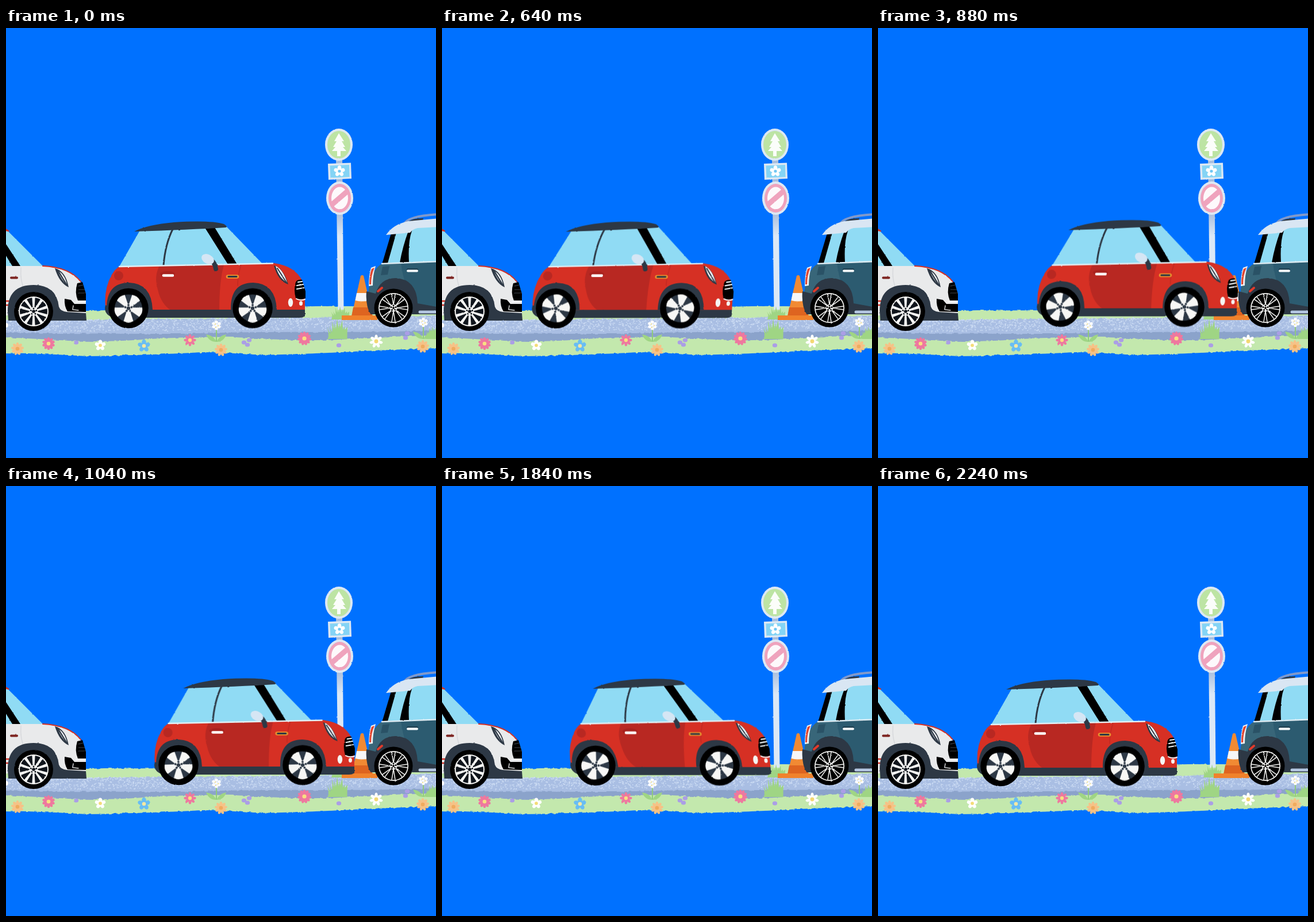
An HTML page for the animation above (2.32 s loop, 748 by 748 pixels).

```html
<!DOCTYPE html>
<html lang="en">
<head>
<meta charset="utf-8">
<title>Parking</title>
<style>
  html, body { margin: 0; width: 100%; height: 100%; overflow: hidden; background: #0071ff; }
  svg { display: block; width: 100vw; height: 100vh; }
</style>
</head>
<body>
<svg id="stage" viewBox="0 0 748 748" xmlns="http://www.w3.org/2000/svg"></svg>
<script>
const DARK = '#2d3845', GLASS = '#90dbf4', PALE = '#dce8f4', RED = '#d63024';
const LOOP = 2320;

// Seeded random numbers for the road texture.
let seed = 11;
const rand = () => (seed = (seed * 16807) % 2147483647) / 2147483647;

const shape = (d, fill) => `<path d="${d}" fill="${fill}"/>`;
const line = (d, color, width, cap = 'round') =>
  `<path d="${d}" fill="none" stroke="${color}" stroke-width="${width}" stroke-linecap="${cap}"/>`;
const oval = (x, y, rx, ry, fill, turn = 0) =>
  `<ellipse cx="${x}" cy="${y}" rx="${rx}" ry="${ry}" fill="${fill}" transform="rotate(${turn} ${x} ${y})"/>`;
const dot = (x, y, r, fill) => oval(x, y, r, r, fill);
const at = (x, y, body) => `<g transform="translate(${x} ${y})">${body}</g>`;
const rough = (kind, body) => `<g filter="url(#${kind})">${body}</g>`;
const ring = (n, draw) =>
  Array.from({ length: n }, (_, i) => `<g transform="rotate(${i * 360 / n})">${draw(i)}</g>`).join('');

const roughFilter = (id, freq, scale) => `
  <filter id="${id}" filterUnits="userSpaceOnUse" x="-40" y="140" width="830" height="450" color-interpolation-filters="sRGB">
    <feTurbulence type="fractalNoise" baseFrequency="${freq}" numOctaves="2" seed="4"/>
    <feDisplacementMap in="SourceGraphic" scale="${scale}" xChannelSelector="R" yChannelSelector="G"/>
  </filter>`;

const flower = (x, y, r, n, color, core) => at(x, y,
  ring(n, () => oval(0, -r * .58, r * (n > 6 ? .23 : .34), r * .43, color)) + dot(0, 0, r * .3, core));

const tuft = (x, y, w, h, color) => {
  const blades = Array.from({ length: 9 }, (_, i) => {
    const k = (i - 4) / 4;
    const tip = h * (1 - .4 * k * k) * (i % 2 ? .8 : 1);
    return `M${k * w * .7 - 4} 0Q${k * w * .6 - 2} ${-tip * .5} ${k * w} ${-tip}Q${k * w * .8 + 3} ${-tip * .4} ${k * w * .7 + 5} 0Z`;
  });
  return at(x, y, shape(blades.join(''), color));
};

const sprig = (x, y) => at(x, y,
  line('M0 4V28', '#8fcb7c', 2) +
  shape('M0 29Q-4 18-18 16Q-13 29 0 29Q13 29 17 16Q5 18 0 29Z', '#9fd584') +
  ring(6, () => dot(0, -5.5, 2.7, '#fff')) + dot(0, 0, 2.6, '#fff') +
  dot(-2, -2, 1, '#f4dc74') + dot(3, 1, 1, '#f4dc74') + dot(-1, 4, 1, '#f4dc74'));

const berries = (x, y, n) => Array.from({ length: n }, (_, i) =>
  oval(x + [0, 3, -6][i], y + [4, -4, 0][i], 4.2, 3.6, '#ab9ee6')).join('');

function ground() {
  const back = 'M-5 493Q90 494 172 491Q340 492 420 488Q520 483 600 484Q680 486 755 492V515H-5Z';
  const road = 'M-5 508Q140 508 260 506Q420 505 520 504Q640 503 755 500V545H-5Z';
  const curb = 'M-5 530Q150 532 300 532Q420 528 560 529Q660 529 755 526V550H-5Z';
  const front = 'M-5 538Q60 541 110 544Q180 547 250 541Q330 536 400 538Q450 541 500 543Q550 544 600 541Q670 536 755 535V557'
    + 'Q690 559 620 562Q520 568 430 569Q390 564 340 564Q250 569 140 571Q80 567 -5 565Z';
  let specks = '';
  for (let i = 0; i < 1500; i++) {
    const x = rand() * 748, top = 508 - x * .008;
    specks += `M${x.toFixed(1)} ${(top + rand() ** 1.25 * 21).toFixed(1)}h.8`;
  }
  return rough('coarse',
    shape(back, '#c3e8ad') + shape(road, '#a9bee3') + line(specks, '#cbdbf3', 1.5) +
    shape(curb, '#8ba3cb') + shape(front, '#c3e8ad'));
}

function meadow() {
  const orange = ['#f6c287', '#f0ab5e'], pink = ['#ee789f', '#f8df82'];
  return rough('fine',
    tuft(576, 541, 18, 36, '#9fd584') +
    flower(20, 558, 11, 9, ...orange) +
    flower(74, 549, 11, 10, ...pink) +
    berries(122, 543, 1) +
    flower(164, 552, 9.5, 5, '#fff', '#f3dc76') +
    flower(240, 553, 11, 5, '#68bdf4', '#f4e8a2') +
    flower(320, 543, 10.5, 8, ...pink) +
    sprig(366, 517) +
    flower(374, 560, 11, 9, ...orange) +
    berries(420, 547, 3) +
    flower(519, 540, 12, 11, ...pink) +
    berries(579, 548, 1) +
    flower(644, 545, 11.5, 7, '#fff', '#f3d873') +
    berries(695, 535, 2) +
    flower(725, 554, 11, 9, ...orange) +
    sprig(726, 512) + tuft(742, 541, 11, 22, '#9fd584') +
    dot(0, 517, 4, '#fff'));
}

function signs() {
  const tree = 'M579 183L588 197H584L590 207H586L592 214H582V223H576V214H567L573 207H569L575 197H571Z';
  const petals = at(580, 249, ring(5, () => oval(0, -5.6, 3.3, 4.2, '#fff')) + dot(0, 0, 2.6, '#71c7f3'));
  return rough('fine',
    shape('M574 226H585L587.5 490H577.5Z', 'url(#pole)') +
    oval(579, 203, 24, 28, PALE) + oval(579, 203, 20, 24, '#bde4a4') + shape(tree, '#fbfdfa') +
    shape('M560 236L600 234.5L601 262L561 264Z', PALE) +
    shape('M563.5 239.5L597 238L597.5 259L564.5 260.5Z', '#84d4f5') + petals +
    oval(580.5, 296, 23.5, 29, PALE) + oval(580.5, 296, 19.5, 25, '#efa3bd') +
    oval(580.5, 296, 14.5, 19.5, '#fdf9fb') + line('M566 308L595 283', '#efa3bd', 9, 'butt'));
}

function cone() {
  return rough('fine',
    tuft(581, 507, 16, 23, '#9fd584') +
    shape('M617 431Q620 429 622 431L638 502H601Z', '#f18a33') +
    shape('M604 486H634L638 502H601Z', '#de6420') +
    shape('M610 461H629L632 474Q620 477 607.5 474Z', '#f6f6f8') +
    shape('M584 500H646V508H584Z', '#f0822c'));
}

const tyre = (r, rim) => dot(0, 0, r, '#000') + rim;

function whiteCar() {
  const rim = dot(0, 0, 26, '#f5f5f3') + dot(0, 0, 24, '#10151c') +
    ring(10, () => shape('M-1.4-5L-2.7-25H2.7L1.4-5Z', '#f5f5f3')) +
    dot(0, 0, 7.5, '#f5f5f3') + ring(5, () => dot(0, -5, 1.5, '#10151c')) + dot(0, 0, 2.8, '#10151c');
  return rough('fine',
    shape('M-5 346L6 353L2 357H-5Z', RED) +
    shape('M-5 352L4 354L64 414H-5Z', GLASS) +
    shape('M-5 368L0 376L25 414H11L-5 388Z', '#000') +
    shape('M-5 414L64 414Q112 418 129 441L139 462V500H-5Z', '#e9eaeb') +
    line('M64 414Q110 416 130 441', RED, 2) +
    line('M-5 475H12M-5 482H9', RED, 2.6, 'butt') +
    line('M26 417Q24 440 33 458', '#d7d9dc', 1.5) +
    line('M9 434.5H19', '#7d2420', 4) +
    shape('M3 492Q3 447 48 447Q88 447 92 485Q95 493 106 494L139 496L140 509H4Z', DARK) +
    shape('M85 418Q104 423 109 451Q93 444 85 418Z', DARK) +
    shape('M90 422Q102 428 106 446Q96 439 90 422Z', '#f1f3f6') +
    line('M91 423L105 446', DARK, 2.4) +
    shape('M124 444L133 442L139 462V474H125Q119 460 124 444Z', '#000') +
    line('M126 449L134 447M126 455H137M126 461H138', '#41474f', 1.2, 'butt') +
    line('M122 476H138', '#f5f7fa', 2) +
    shape('M102 471L113 473L119 480H139V494L107 493Q101 484 102 471Z', '#000') +
    line('M117 483L116 490L126 491', '#e9eaeb', 1.4) +
    at(48, 493, tyre(34, rim)));
}

function tealCar() {
  const rim = dot(0, 0, 26, '#f5f5f3') + dot(0, 0, 24.3, '#000') +
    ring(8, () => line('M0-5L-3-24M0-5L3-24', '#f5f5f3', 1.5)) +
    dot(0, 0, 6.5, '#f5f5f3') + ring(5, () => dot(0, -4.3, 1.5, '#000')) + dot(0, 0, 2, '#000');
  return rough('fine',
    line('M693 341Q698 327 752 324', '#8099cb', 4) +
    shape('M699 338Q704 331 726 331L724 338Z', DARK) +
    shape('M670 357L755 343V408L654 411Z', '#000') +
    shape('M679 356L700 353Q690 380 685 408L664 409Z', GLASS) +
    shape('M706 353Q707 347 714 346L755 343V406L701 408Q699 372 706 353Z', GLASS) +
    shape('M661 360Q674 341 700 336L755 331V346L716 348Q707 350 703 356Z', '#d9e6f3') +
    shape('M654 410L755 406V496H640L630 462Q634 421 654 410Z', '#386679') +
    shape('M687 409L755 406V496H716Q692 450 687 409Z', '#2c5b70') +
    line('M654 410L755 406', '#dcebf2', 2.6) +
    shape('M655 415L667 414L664 429L652 430Z', '#2a5266') +
    shape('M635 417L643 414Q638 430 638 448L631 449Q631 430 635 417Z', '#edf0f2') +
    shape('M636 419L641 417Q635 430 635 446L632 446Q632 430 636 419Z', '#e14531') +
    shape('M627 458L643 462Q651 435 678 435Q714 437 716 479L755 486V498H634Q625 482 627 458Z', DARK) +
    line('M720 494H755', '#b4c7e2', 5) +
    line('M647 458L654 452', '#e33a2a', 4) +
    line('M699 420H715', '#1e4052', 4) + line('M699 422.5H715', '#f7fafb', 3.8) +
    at(674, 487, tyre(33.5, rim)));
}

function redBody() {
  const arch = x => `M${x - 38} 490Q${x - 39} 443 ${x + 1} 443Q${x + 40} 444 ${x + 42} 490Z`;
  return rough('fine',
    shape('M233 352L197 415L446 410L383 345Z', GLASS) +
    line('M290 350Q277 376 274 413', DARK, 3) +
    shape('M347 349L363 347L402 411L386 411Z', '#000') +
    shape('M223 354Q246 342 292 338Q356 334 379 341Q387 346 382 347Q320 351 223 354Z', DARK) +
    shape('M173 486Q170 454 184 429Q190 419 197 415L466 409Q502 414 515 439L520 470V493H173Z', RED) +
    shape('M267 414Q257 432 264 455Q270 482 290 493H371Q371 440 379 412Z', '#b82822') +
    line('M409 412Q403 430 403 448', '#c22a22', 1.6) +
    line('M197 415L464 409.5', '#e3eff4', 2.4) +
    dot(196, 431, 8, '#b82822') +
    oval(281, 428, 13, 5, '#a8221e') + line('M274 430.5H290', '#fff', 4.6) +
    line('M386 432.5H402', '#e8912d', 6.5) + line('M387 432.5H401', DARK, 3) +
    line('M358 405Q363 408 365 419', DARK, 8) + oval(351, 402, 11.5, 8, '#d5e6f4', 28) +
    shape('M173 482L182 486L185 490H520V501Q518 504 510 504H188Q172 500 172 487Z', DARK) +
    shape(arch(213) + arch(429), DARK) +
    shape('M466 413Q483 418 491 446Q473 440 466 413Z', DARK) +
    shape('M469 414Q482 420 489 443Q475 435 469 414Z', '#f7f8fa') +
    line('M472 418L488 443', DARK, 2) +
    shape('M504 442Q507 437 515 438L521 458V470Q512 474 504 470Q500 455 504 442Z', '#000') +
    line('M508 442L515 441M506 448L517 446M506 454L518 452', '#edf3f7', 2.2) +
    line('M505 471Q512 475 520 472', '#f3f5f7', 2) +
    oval(495, 477.5, 4.2, 7.5, '#f5f5f3') + oval(513, 479, 3, 4, '#f5f5f3'));
}

function redWheel(x) {
  const blades = ring(5, () => shape('M-3 5L-8.5 22.5Q0 27 8.5 22.5L3 5Z', '#f7f7f5'));
  const hub = dot(0, 0, 8, '#f7f7f5') + ring(5, () => dot(0, -5.6, 1.9, DARK)) + dot(0, 0, 3.2, DARK);
  return at(x, 487.5, dot(0, 0, 34.8, '#000') + `<g class="spin">${dot(0, 0, 24, DARK) + blades + hub}</g>`);
}

document.getElementById('stage').innerHTML = `
  <defs>
    ${roughFilter('fine', .2, 1.8)}${roughFilter('coarse', .14, 4.5)}
    <linearGradient id="pole" gradientUnits="userSpaceOnUse" x1="0" y1="322" x2="0" y2="362">
      <stop offset="0" stop-color="#a9bedd"/><stop offset="1" stop-color="#dbe8f6"/>
    </linearGradient>
  </defs>
  ${ground()}${signs()}${cone()}${whiteCar()}${tealCar()}
  <g id="body">${redBody()}</g>
  <g id="wheels">${rough('fine', redWheel(213) + redWheel(429))}</g>
  ${meadow()}`;

// time, wheel travel, body travel, lean
const steps = [
  [0, 0, 0, 0],
  [480, -9, -11.5, -.017], [560, -26, -28, -.05], [640, -15, -16, .06],
  [720, 21.5, 20.5, .118], [800, 66, 65, .1], [880, 104, 104, .03],
  [960, 96, 95, -.04], [1040, 87, 86, -.005],
  [1600, 91, 91.5, .04], [1680, 104, 106, .06], [1760, 88, 89, 0],
  [1840, 54, 52, -.09], [1920, 16, 14, -.09], [2000, -13, -15, -.03],
  [2080, -10, -11, .03], [2160, -4, -5, .015], [2240, 0, 0, 0],
  [LOOP, 0, 0, 0]
];
const BASE = 495, RADIUS = 34.8, SLOPE = -.023;

function play(el, pose) {
  const frames = steps.map(([time, ...values]) =>
    ({ offset: time / LOOP, transform: pose(...values), easing: 'steps(1, end)' }));
  el.animate(frames, { duration: LOOP, iterations: Infinity }).startTime = start;
}

const start = performance.now();
play(document.getElementById('body'), (wheel, body, lean) =>
  `matrix(1, 0, ${-lean}, 1, ${body + BASE * lean}, ${body * SLOPE})`);
play(document.getElementById('wheels'), wheel => `translate(${wheel}px, ${wheel * SLOPE}px)`);
document.querySelectorAll('.spin').forEach(el => play(el, wheel => `rotate(${wheel / RADIUS}rad)`));
</script>
</body>
</html>
```
